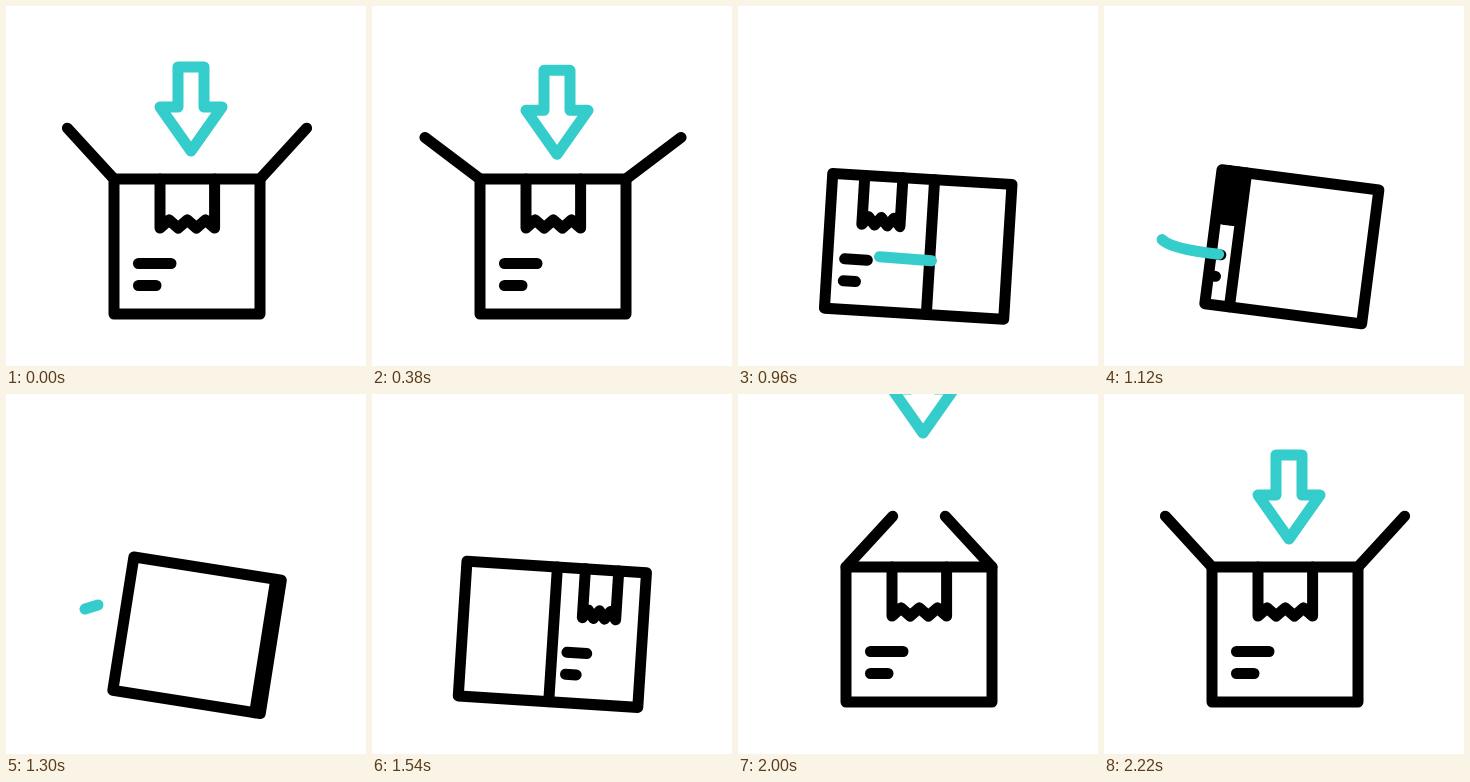
Recreate the animation shown at these times as an HTML page with a canvas. Size 360x360 px, loop 2.42 s.

```html
<!DOCTYPE html>
<html lang="en">
<head>
<meta charset="utf-8">
<title>Box packing</title>
<style>
  html, body { margin: 0; width: 100%; height: 100%; overflow: hidden; background: #fff; }
  canvas { display: block; width: 100vmin; height: 100vmin; }
</style>
</head>
<body>
<canvas width="360" height="360"></canvas>
<script>
const ctx = document.querySelector('canvas').getContext('2d');
const LOOP = 2420, TEAL = '#35cccc', BLACK = '#000';
const SIZE = 146, HEIGHT = 135, CENTER = 181, BASE = 308, TOP = BASE - HEIGHT;

const ramp = (t, from, to) => Math.min(1, Math.max(0, (t - from) / (to - from)));
const ease = (t, from, to) => (1 - Math.cos(Math.PI * ramp(t, from, to))) / 2;

function stroke(points, color = BLACK, closed = false, fill = false) {
  ctx.beginPath();
  points.forEach(([x, y]) => ctx.lineTo(x, y));
  if (closed) ctx.closePath();
  if (fill) { ctx.fillStyle = '#fff'; ctx.fill(); }
  ctx.strokeStyle = color;
  ctx.stroke();
}

function arrow(t) {
  if (t >= 560 && t < 1850) return;
  const dy = t < 560
    ? -15 * ease(t, 0, 220) + 18 * Math.pow(Math.max(0, t - 220) / 160, 3)
    : -165 * (1 - ease(t, 1850, 2220));
  const outline = [[172, 61], [198, 61], [198, 101], [216, 101], [185, 145], [154, 101], [172, 101]];
  stroke(outline.map(([x, y]) => [x, y + dy]), TEAL, true);
}

function flaps(t) {
  if (t >= 600 && t < 1850) return;
  const degrees = t < 600
    ? 47.5 - 10.5 * ease(t, 0, 380) + 143 * Math.pow(ramp(t, 380, 600), 3)
    : 180 - 132.5 * ease(t, 1850, 2220);
  const a = degrees * Math.PI / 180, dx = 69 * Math.cos(a), y = TOP - 69 * Math.sin(a);
  for (const side of [-1, 1]) {
    const x = CENTER + side * SIZE / 2;
    stroke([[x, TOP], [x + side * dx, y]]);
  }
}

// Tape and text lines, squeezed to the visible width of the front face
function label(left, right) {
  const at = (x, y) => [left + (right - left) * x / SIZE, y - HEIGHT];
  const tape = [at(46, 0)];
  for (let i = 0; i <= 6; i++) tape.push(at(46 + i * 9.1, i % 2 ? 41 : 49));
  tape.push(at(100.6, 0));
  stroke(tape);
  stroke([at(24.5, 84.5), at(57, 84.5)]);
  stroke([at(24.5, 106.5), at(42, 106.5)]);
}

function box(t) {
  const second = t >= 1235;
  const turn = second ? ease(t, 1235, 1825) : ease(t, 720, 1235);
  const bulge = Math.sin(Math.PI * turn);
  const left = -SIZE / 2 - 22 * bulge, right = SIZE / 2 + 12 * bulge;
  const edge = SIZE / 2 - SIZE * turn;
  const tilt = 9 * (ease(t, 720, 1280) - ease(t, 1290, 1740));

  ctx.save();
  ctx.translate(CENTER, BASE);
  ctx.rotate(tilt * Math.PI / 180);
  stroke([[left, -HEIGHT], [right, -HEIGHT], [right, 0], [left, 0]], BLACK, true, true);
  if (turn > 0 && turn < 1) stroke([[edge, -HEIGHT], [edge, 0]]);
  ctx.beginPath();
  ctx.rect(left - 5.5, -HEIGHT - 6, right - left + 11, HEIGHT + 12);
  ctx.clip();
  const [from, to] = second ? [edge, right] : [left, edge];
  if (to - from > 8) label(from, to);
  ctx.restore();
}

const swoosh = new Path2D('M210 256 L145 251 C90 247 56 240 56 229 C56 222 64 219.5 73 217 L92 211');
const SWOOSH_LENGTH = 208;

function speedLine(t) {
  const head = SWOOSH_LENGTH * ease(t, 732, 1320);
  const tail = SWOOSH_LENGTH * ease(t, 861, 1410);
  if (head - tail < 1) return;
  ctx.save();
  ctx.setLineDash([head - tail, 1000]);
  ctx.lineDashOffset = -tail;
  ctx.strokeStyle = TEAL;
  ctx.stroke(swoosh);
  ctx.restore();
}

function draw(now) {
  const t = now % LOOP;
  ctx.clearRect(0, 0, 360, 360);
  ctx.lineWidth = 11;
  ctx.lineCap = ctx.lineJoin = 'round';
  arrow(t);
  flaps(t);
  box(t);
  speedLine(t);
}

const start = performance.now();
function tick() {
  draw(performance.now() - start);
  requestAnimationFrame(tick);
}
tick();
</script>
</body>
</html>
```
